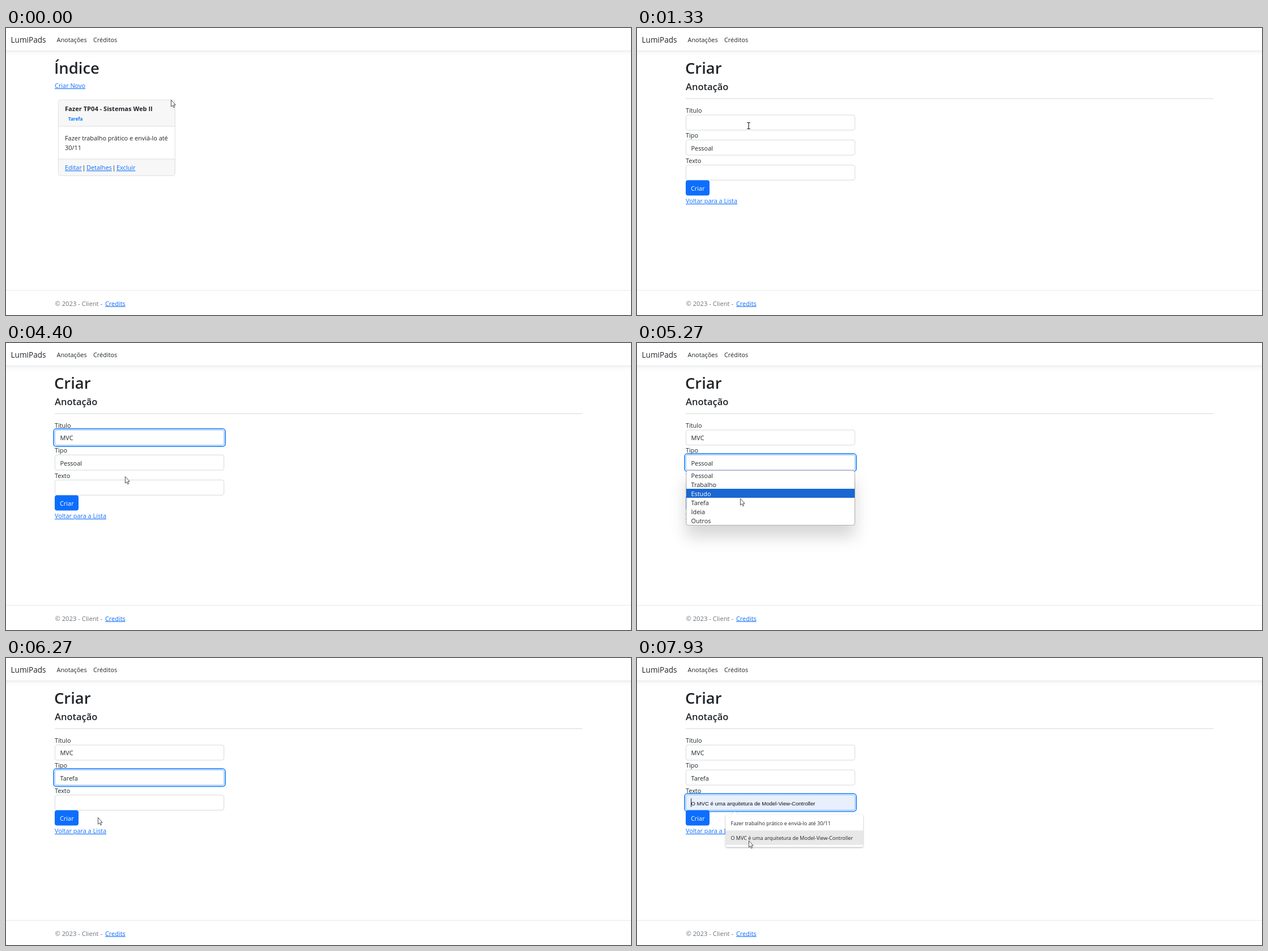
An HTML page that plays this animation: 1103x508 px, repeating every 8 s.

```html
<!DOCTYPE html>
<html lang="pt-BR">
<head>
<meta charset="utf-8">
<title>Anotações</title>
<style>
  html, body { margin: 0; width: 100%; height: 100%; overflow: hidden; background: #fff; }
  svg { display: block; font: 10.9px "Open Sans", "Noto Sans", sans-serif; }
  text { fill: #212529; white-space: pre; }
  .link { fill: #0d6efd; text-decoration: underline; }
  .hover { fill: #0a58ca; }
  .muted { fill: #6c757d; font-size: 11.2px; }
  .light { fill: #fff; }
  .brand { font-size: 13.6px; }
  .h1 { font-size: 27.4px; font-weight: 600; }
  .h4 { font-size: 16.5px; font-weight: 600; }
  .bold { font-size: 11.1px; font-weight: 700; }
  .badge { font-size: 8.2px; font-weight: 700; fill: #0d7cf5; }
  .small { font-size: 9px; }
  .preview { font: 9.55px "Liberation Sans", Arial, sans-serif; fill: #111; }
  .nav { fill: #fff; filter: drop-shadow(0 3px 4px rgba(0, 0, 0, .06)); }
  .field { fill: #fff; stroke: #d0d5da; stroke-width: .9; }
  .menu { fill: #fff; stroke: #8a8a8a; stroke-width: .7; filter: drop-shadow(0 20px 14px rgba(0, 0, 0, .16)); }
  .popup { fill: #fff; filter: drop-shadow(0 1px 1.5px rgba(0, 0, 0, .32)); }
</style>
</head>
<body>
<svg id="stage" width="1103" height="508" viewBox="0 0 1103 508"></svg>
<script>
const LOOP = 8000, FPS = 15;
const fieldY = [154, 198.2, 242.5], focusAt = [1600, 4600, 6800, Infinity];
const types = ['Pessoal', 'Trabalho', 'Estudo', 'Tarefa', 'Ideia', 'Outros'];
const notes = ['Fazer trabalho prático e enviá-lo até 30/11',
               'O MVC é uma arquitetura de Model-View-Controller'];
const caretX = [95.5, 105.5, 112.5, 119.7];
const rowH = 16;

// time, x, y of the pointer, and its shape from that time on
const path = [
  [0, 291, 127, 'arrow'], [265, 130, 107, 'hand'], [330, 119, 105, 'hand'],
  [600, 119, 105, 'beam'], [1000, 119, 105, 'beam'], [1130, 156, 137, 'arrow'],
  [1265, 190, 168, 'beam'], [1330, 197, 173, 'beam'], [4130, 197, 173, 'beam'],
  [4260, 204, 198, 'arrow'], [4400, 210, 236, 'arrow'], [4660, 196, 215, 'arrow'],
  [5070, 196, 215, 'arrow'], [5267, 182, 275, 'arrow'], [5470, 168, 298, 'arrow'],
  [5800, 162, 282, 'arrow'], [6267, 162, 282, 'arrow'], [6465, 168, 266, 'beam'],
  [6600, 172, 256, 'beam'], [7333, 172, 256, 'beam'], [7398, 180, 273, 'arrow'],
  [7533, 196, 305, 'arrow'], [7733, 198, 335, 'arrow'], [7800, 198, 335, 'arrow'],
  [7866, 197, 323, 'arrow'], [LOOP, 197, 323, 'arrow']
];

const text = (x, y, s, cls = '', id = '') => `<text x="${x}" y="${y}" class="${cls}" id="${id}">${s}</text>`;
const rect = (x, y, w, h, attrs = '') => `<rect x="${x}" y="${y}" width="${w}" height="${h}" ${attrs}/>`;
const line = (x1, x2, y, color) => `<path d="M${x1} ${y}H${x2}" stroke="${color}" stroke-width=".8"/>`;
const group = (id, ...parts) => `<g id="${id}">${parts.join('')}</g>`;

const frame =
  rect(-20, 0, 1143, 40, 'class="nav"') + line(0, 1103, 40.4, '#dee2e6') +
  text(8.5, 25.6, 'LumiPads', 'brand') + text(89.5, 24.8, 'Anotações') + text(154, 24.8, 'Créditos') +
  line(0, 1103, 464.4, '#dee2e6') +
  text(86.5, 491.5, '© 2023 - Client -', 'muted') + text(175, 491.5, 'Credits', 'link');

const index = group('index',
  text(85, 80.5, 'Índice', 'h1'), text(86, 105.8, 'Criar Novo', 'link', 'create'),
  rect(92.4, 127.2, 206, 134.2, 'rx="4" fill="#f7f7f7"'),
  rect(92.4, 174, 206, 58, 'fill="#fff"'),
  line(92.4, 298.4, 173.9, '#d8d8d8'), line(92.4, 298.4, 231.9, '#d8d8d8'),
  rect(92.4, 127.2, 206, 134.2, 'rx="4" fill="none" stroke="#dadada" stroke-width=".8"'),
  text(104, 146.8, 'Fazer TP04 - Sistemas Web II', 'bold'), text(109.8, 163.8, 'Tarefa', 'badge'),
  text(104, 199.2, 'Fazer trabalho prático e enviá-lo até'), text(104, 216.3, '30/11'),
  text(104, 251.3, 'Editar', 'link'), text(134.6, 251.3, '|'), text(142, 251.3, 'Detalhes', 'link'),
  text(187.6, 251.3, '|'), text(195, 251.3, 'Excluir', 'link'));

const field = (y, i) =>
  text(86, y - 4, ['Título', 'Tipo', 'Texto'][i]) +
  rect(86.4, y, 298.2, 26.8, `rx="3.5" class="field" id="box${i}"`) +
  group('ring' + i,
    rect(86.4, y, 298.2, 26.8, 'rx="3.5" fill="none" stroke="#86b7fe" stroke-width=".8"'),
    rect(84, y - 2.4, 303, 31.6, 'rx="5" fill="none" stroke="#258cfb" stroke-width="1.8"')) +
  text(95.5, y + (i < 2 ? 18.3 : 18.5), '', i < 2 ? '' : 'preview', 'value' + i);

const menu = group('menu',
  rect(86.8, 225.6, 297.6, 97, 'rx="4" class="menu"'),
  rect(87, 0, 297.2, rowH, 'id="option" fill="#1967d2"'),
  ...types.map((s, i) => text(95.5, 238.6 + i * rowH, s, '', 'type' + i)));

const popup = group('popup',
  '<path class="popup" d="M159 277H167L172.500 271.500 178 277H397q2 0 2 2V332q0 2.500-2.500 2.500H159q-2.500 0-2.500-2.500V279q0-2 2.500-2z"/>',
  rect(156.5, 0, 242.5, 25.8, 'id="choice" fill="#e8e8e8"'),
  ...notes.map((s, i) => text(165.5, 296 + i * 25.8, s, 'small')));

const form = group('form',
  text(85, 80.5, 'Criar', 'h1'), text(86, 109.7, 'Anotação', 'h4'), line(86, 1017, 125, '#c8c9ca'),
  ...fieldY.map(field),
  rect(86, 269.5, 42, 27, 'rx="4" fill="#0d6efd"'), text(95, 288, 'Criar', 'light'),
  text(86, 310, 'Voltar para a Lista', 'link'),
  rect(0, 0, .9, 15, 'id="caret"'), menu, popup);

const pointer = group('pointer',
  '<path id="arrow" d="M.4.500V12.200L3 9.800 4.800 13.800 6.600 13 4.800 9.200H8.200z" fill="#fff" stroke="#222" stroke-width=".8"/>',
  '<path id="hand" d="M-1.200 9V1q1.200-1.800 2.400 0V5q2-.8 2.300.5 1.900-.6 2.200.6 1.900-.4 2 1V10q0 2-1.500 4.500H0Q-2 11-4 8.500-4 6.500-1.200 9z" fill="#fff" stroke="#222" stroke-width=".8"/>',
  '<path id="beam" d="M-2.800-5.500H-1L0-5 1-5.500H2.800M0-5V5M-2.800 5.500H-1L0 5 1 5.500H2.800" fill="none" stroke="#111" stroke-width="1.100"/>');

const $ = id => document.getElementById(id);
$('stage').innerHTML = frame + index + form + pointer;

const show = (id, on) => { $(id).style.display = on ? '' : 'none'; };
const ramp = (t, start, span) => Math.min(1, Math.max(0, (t - start) / span));
const within = (t, a, b) => t >= a && t < b;

function pointerAt(t) {
  const i = path.findLastIndex(k => k[0] <= t);
  const a = path[i], b = path[i + 1] || a;
  const p = ramp(t, a[0], b[0] - a[0] || 1);
  return { x: a[1] + (b[1] - a[1]) * p, y: a[2] + (b[2] - a[2]) * p, shape: a[3] };
}

function draw(t) {
  const { x, y, shape } = pointerAt(t);
  $('pointer').setAttribute('transform', `translate(${x} ${y})`);
  ['arrow', 'hand', 'beam'].forEach(s => show(s, s === shape));
  show('index', t < 599);
  show('form', t >= 599);
  $('create').classList.toggle('hover', shape === 'hand');

  fieldY.forEach((_, i) => {
    $('ring' + i).style.opacity = ramp(t, focusAt[i], 180) * (1 - ramp(t, focusAt[i + 1], 180));
  });

  const typed = [3065, 3665, 3865].filter(s => t >= s).length;
  $('value0').textContent = 'MVC'.slice(0, typed);
  $('value1').textContent = types[t < 6265 ? 0 : 3];

  show('menu', within(t, 4730, 6265));
  $('menu').style.opacity = ramp(t, 4660, 200);
  const row = Math.min(5, Math.max(0, Math.floor((y - 228) / rowH)));
  $('option').setAttribute('y', 226 + row * rowH);
  types.forEach((_, i) => $('type' + i).classList.toggle('light', i === row));

  show('popup', t >= 6930);
  const choice = t < 7390 || y < 277 || y > 332 ? -1 : y < 305.5 ? 0 : 1;
  show('choice', choice >= 0);
  $('choice').setAttribute('y', 279.4 + choice * 25.8);
  $('value2').textContent = notes[choice] || '';
  $('box2').style.fill = choice < 0 ? '#fff' : '#e8f0fe';

  const inText = t >= 6865;
  show('caret', [[1665, 2265], [2730, 3599], [3665, 4398], [6865, 7398], [7930, LOOP]]
    .some(([a, b]) => within(t, a, b)));
  $('caret').setAttribute('x', inText ? 95.2 : caretX[typed]);
  $('caret').setAttribute('y', inText ? 248.5 : 160);
}

const start = performance.now();
function tick() {
  const t = (performance.now() - start) % LOOP;
  draw(Math.floor(t * FPS / 1000 + .05) * 1000 / FPS);
  requestAnimationFrame(tick);
}
tick();
</script>
</body>
</html>
```
